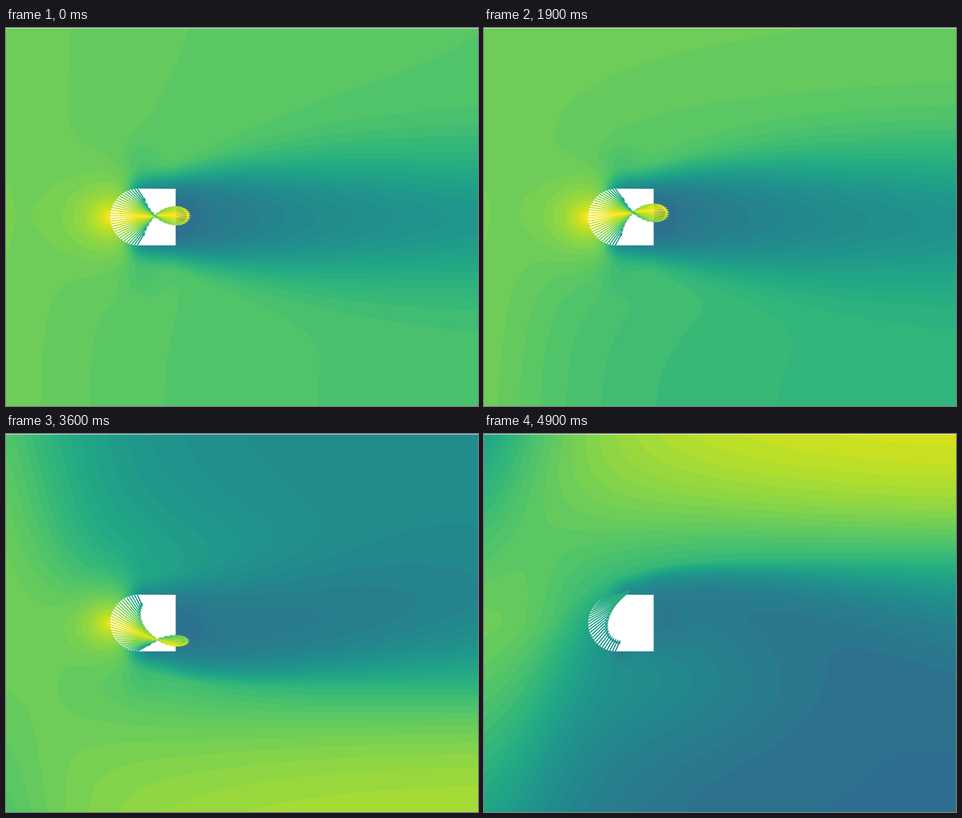
Write an HTML page with a canvas that moves like this. It is 836 px wide and 670 px high and loops after 5 s.

```html
<!DOCTYPE html>
<html lang="en">
<head>
<meta charset="utf-8">
<title>Flow around a blunt body</title>
<style>
  html, body { margin: 0; width: 100%; height: 100%; overflow: hidden; background: #fff; }
  canvas { display: block; }
</style>
</head>
<body>
<canvas id="stage" width="836" height="670"></canvas>
<script>
const W = 836, H = 670, MID = 335, STEP = 0.0175;
const { exp, pow, abs, sin, cos, hypot, min, max, floor, round, PI } = Math;
const ctx = document.getElementById('stage').getContext('2d');
const img = ctx.createImageData(W, H);
const px = new Uint32Array(img.data.buffer);

// Viridis colour map
const stops = ('440154 481a6c 472f7d 414487 39568c 31688e 2a788e 23888e ' +
  '1f988b 22a884 35b779 54c568 7ad151 a5db36 d2e21b fde725').split(' ').map(s => parseInt(s, 16));

function viridis(v) {
  const p = min(max(v, 0), 0.9999) * (stops.length - 1), i = floor(p);
  return [16, 8, 0].map(s => {
    const a = stops[i] >> s & 255, b = stops[i + 1] >> s & 255;
    return round(a + (b - a) * (p - i));
  });
}

const bands = Array.from({ length: floor(1 / STEP) + 1 }, (_, i) => viridis((i + 0.5) * STEP));
const packed = Uint32Array.from(bands, ([r, g, b]) => (255 << 24 | b << 16 | g << 8 | r) >>> 0);
const band = v => max(0, min(bands.length - 1, floor(v / STEP)));

const sigmoid = z => 1 / (1 + exp(-z));
const blob = (dx, dy, r) => exp(-(dx * dx + dy * dy) / (r * r));

// Level flow: a symmetric wake behind the body
function level(x, y) {
  const d = abs(y - MID), u = max(0, x - 300);
  const far = 0.72 + 0.065 * exp(-x / 350);
  const core = 0.58 - 0.22 * exp(-u / 330);
  const width = 72 + 60 * (1 - exp(-u / 300)) - 0.12 * max(0, 300 - x);
  const wake = exp(-pow(d / width, 2 + 2 * exp(-u / 150))) * sigmoid((x - 222) / 7);
  return far - (far - core) * wake - 0.035 * blob(x - 238, d - 95, 36);
}

// Pressure in front of the nose
const nose = (x, y) =>
  0.27 * exp(-hypot(x - 187, 1.2 * (y - MID)) / 44) * sigmoid((222 - x) / 8);

// Full tilt upwards: inlet side, and the shear layer further on
const inlet = y => 0.775 - 0.2 * pow(abs(y - MID) / MID, 1.4);

function shear(x, y) {
  const center = 220 + 200 * exp(-pow(x / 160, 1.5));
  const above = 62 + 75 * exp(-x / 350);
  const below = 16 + 45 * pow(x > 300 ? (x - 300) / 536 : (300 - x) / 150, 1.5);
  const low = 0.365
    + 0.075 * exp(-pow((x - 290) / 250, 2) - pow((y - 440) / 120, 2))
    - 0.05 * blob(x - 310, y - MID, 50);
  return low + (0.96 - low) * sigmoid((center - y) / (y < center ? above : below))
    - 0.04 * blob(x - 120, y - 210, 110)
    - 0.1 * blob(x - 252, y - 282, 20)
    - 0.08 * blob(x - 242, y - 388, 16);
}

const layer = () => new Float32Array(W * H);
const base = layer(), front = layer(), upstream = layer(), downstream = layer(), nearNose = layer();
for (let y = 0, i = 0; y < H; y++)
  for (let x = 0; x < W; x++, i++) {
    const b = 1 - exp(-pow(x / 165, 1.2));
    base[i] = level(x, y);
    front[i] = nose(x, y);
    upstream[i] = (1 - b) * (inlet(y) - base[i]);
    downstream[i] = b * (shear(x, y) - base[i]);
    nearNose[i] = downstream[i] * blob(x - 185, y - MID, 90);
  }

// The outlet reacts early to the tilt, the inlet and the nose late
function sampler(tilt) {
  const m = min(1, abs(tilt)), early = sin(m * PI / 2);
  const slow = pow(m, 1.8), late = pow(m, 3) - early, push = 1 - pow(m, 4);
  return (x, y) => {
    const i = y * W + x, j = tilt > 0 ? (H - 1 - y) * W + x : i;
    return base[i] + front[i] * push + upstream[j] * slow
      + downstream[j] * early + nearNose[j] * late;
  };
}

function drawField(value) {
  for (let y = 0, i = 0; y < H; y++)
    for (let x = 0; x < W; x++, i++) px[i] = packed[band(value(x, y))];
  ctx.putImageData(img, 0, 0);
  ctx.fillStyle = 'rgba(255,255,255,.75)';
  ctx.fillRect(0, 0, W, 1);
}

function drawBody() {
  ctx.fillStyle = '#fff';
  ctx.beginPath();
  ctx.moveTo(300.5, 285);
  ctx.arc(235, MID, 50.3, -PI / 2, PI / 2, true);
  ctx.lineTo(300.5, 385.3);
  ctx.fill();
}

function arrow(x, y, angle, len, color) {
  const neck = len - min(8, len * 0.4);
  ctx.save();
  ctx.translate(x, y);
  ctx.rotate(angle);
  ctx.fillStyle = color;
  ctx.beginPath();
  ctx.moveTo(0, -1.1);
  ctx.lineTo(neck + 1, -1.1);
  ctx.lineTo(neck, -2.9);
  ctx.lineTo(len, 0);
  ctx.lineTo(neck, 2.9);
  ctx.lineTo(neck + 1, 1.1);
  ctx.lineTo(0, 1.1);
  ctx.fill();
  ctx.restore();
}

function drawArrows(tilt, value) {
  const count = 32, focusX = 264 + 20 * tilt * tilt, focusY = 334.5 + 62 * tilt;
  const reach = 121 - 82 * tilt * tilt;
  const skew = 0.8 * sin(tilt * PI / 2);
  for (let i = 0; i < count; i++) {
    const phi = PI * ((i + 0.5) / count - 0.5), c = cos(phi), s = sin(phi);
    const x = 235 - 50 * c, y = MID - 50 * s;
    const v = value(round(x - 2 * c), round(y - 2 * s));
    arrow(x, y, Math.atan2(focusY - y, focusX - x),
      22 + reach * c * (1 - skew * s), `rgb(${viridis(v)})`);
  }
}

let last = -1;
function frame(now) {
  const t = floor(now % 5000 / 100) * 100;
  if (t !== last) {
    last = t;
    const tilt = -0.02 - sin(2 * PI * (t + 5) / 3940);
    const value = sampler(tilt);
    drawField(value);
    drawBody();
    drawArrows(tilt, value);
  }
  requestAnimationFrame(frame);
}
frame(0);
</script>
</body>
</html>
```
